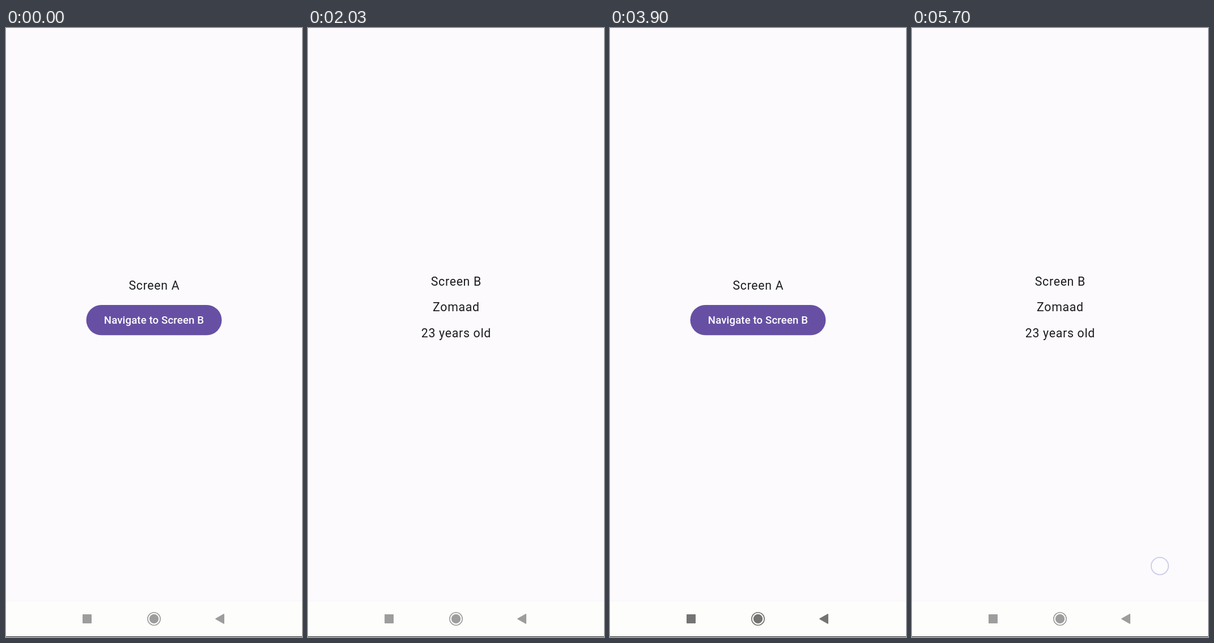
These frames come from a looping animation (522x1073 px, 5730 ms). An HTML page:

```html
<!DOCTYPE html>
<html lang="en">
<head>
<meta charset="utf-8">
<title>Screen navigation</title>
<style>
  html, body { margin: 0; width: 100%; height: 100%; overflow: hidden; background: #fcfafd; }
  svg { display: block; width: 522px; height: 1073px; }

  text { font: 400 21.27px Roboto, sans-serif; letter-spacing: .7px; text-anchor: middle; fill: #1c1b1f; }
  .label { font-weight: 500; font-size: 18.6px; letter-spacing: .13px; fill: #fff; }
  .page { fill: #fcfafd; }

  .a, .b, .press, .nav, .tap, .touch { animation: 5730ms linear infinite; }
  .a { animation-name: screen-a; animation-timing-function: cubic-bezier(.4, 0, .2, 1); }
  .b { animation-name: screen-b; animation-timing-function: cubic-bezier(.4, 0, .2, 1); }
  .press { animation-name: press; }
  .nav { animation-name: dim; animation-timing-function: ease-in-out; }
  .tap { animation-name: tap; }
  .touch { animation-name: touch; }

  /* 700 ms cross-fades starting at 680, 2360 and 4140 ms */
  @keyframes screen-a {
    0%, 11.867% { opacity: 1; }
    24.084%, 41.187% { opacity: 0; }
    53.403%, 72.251% { opacity: 1; }
    84.468%, 100% { opacity: 0; }
  }
  @keyframes screen-b {
    0%, 11.867% { opacity: 0; }
    24.084%, 41.187% { opacity: 1; }
    53.403%, 72.251% { opacity: 0; }
    84.468%, 100% { opacity: 1; }
  }
  @keyframes press {
    0%, 10.471% { opacity: 0; }
    11.78%, 24.084% { opacity: .1; }
    24.09%, 68.063% { opacity: 0; }
    69.372%, 100% { opacity: .1; }
  }
  /* navigation icons wake on a tap, then dim again */
  @keyframes dim {
    0%, 39.96% { color: #9d9d9d; }
    44.33%, 77.66% { color: #747474; }
    96.51%, 100% { color: #9d9d9d; }
  }
  @keyframes tap {
    0%, 39.7% { opacity: 0; }
    41.2%, 42.5% { opacity: .05; }
    47%, 100% { opacity: 0; }
  }
  @keyframes touch {
    0%, 99.47% { opacity: 0; }
    99.476%, 100% { opacity: 1; }
  }
</style>
</head>
<body>
<svg viewBox="0 0 522 1073">
  <rect class="page" width="522" height="1073"/>

  <g class="a">
    <text x="261.4" y="460.5">Screen A</text>
    <rect x="141.5" y="488" width="239" height="53.2" rx="26.6" fill="#6750a4"/>
    <rect class="press" x="141.5" y="488" width="239" height="53.2" rx="26.6" fill="#fff"/>
    <text class="label" x="261" y="521.3">Navigate to Screen B</text>
  </g>

  <!-- opaque page, so it covers screen A while fading -->
  <g class="b">
    <rect class="page" width="522" height="1009"/>
    <text x="261.4" y="453.7">Screen B</text>
    <text x="261.4" y="499.3">Zomaad</text>
    <text x="261.4" y="544.9">23 years old</text>
  </g>

  <rect y="1009" width="522" height="64" fill="#fdfdfb"/>
  <rect y="1009" width="522" height="1" fill="#f8f6f8"/>
  <rect class="tap" x="321" y="1010" width="112" height="62" rx="31"/>
  <g class="nav" fill="currentColor" stroke="currentColor" stroke-width="1.6" stroke-linejoin="round">
    <rect x="135.8" y="1033.8" width="14.4" height="14.4"/>
    <circle cx="261" cy="1041" r="11.2" fill="none"/>
    <circle cx="261" cy="1041" r="8.2" stroke="none"/>
    <path d="M370 1041 L384.2 1033 V1049 Z"/>
  </g>
  <rect y="1072" width="522" height="1" fill="#1c1c1c"/>

  <circle class="touch" cx="437" cy="948" r="15.2" fill="#fcfbfd" stroke="#cfd0e8" stroke-width="2"/>
</svg>
</body>
</html>
```
